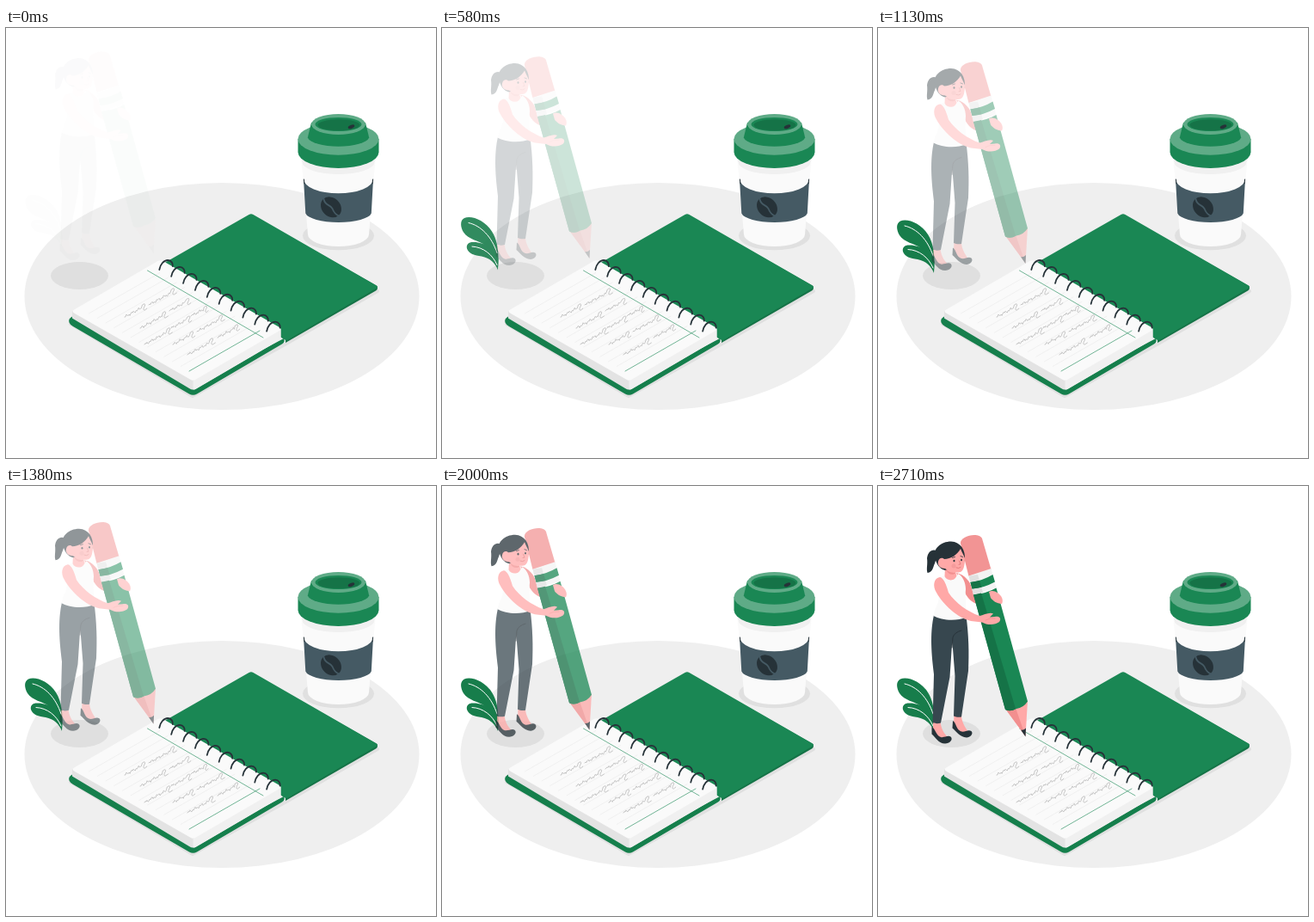
An HTML page for the animation above (2750 ms loop, 500 by 500 pixels).

```html
<!DOCTYPE html>
<html lang="en">
<head>
<meta charset="utf-8">
<title>Writing notes</title>
<style>
html, body { margin: 0; width: 100%; height: 100%; overflow: hidden; background: #fff; }
svg { display: block; width: 100vw; height: 100vh; }
</style>
</head>
<body>
<svg viewBox="0 0 500 500" fill="none" stroke-linecap="round" stroke-linejoin="round">
  <ellipse cx="251" cy="312" rx="229.5" ry="132" fill="#efefef"/>
  <ellipse cx="85.5" cy="288" rx="33.5" ry="16" fill="#dfdfdf"/>

  <g id="cup">
    <ellipse cx="386.5" cy="241.5" rx="41.5" ry="16.8" fill="#e0e0e0"/>
    <path d="M343 148L351 240A35.500 14 0 0 0 422 240L430 148Z" fill="#fafafa"/>
    <path d="M343.500 150L344.500 156A42 14 0 0 0 428.500 156L429.500 150Z" fill="#f0f0f0"/>
    <path d="M346 175.500L348.300 215.500A38.500 11.800 0 0 0 424.800 215.500L427 175.500A40.500 16.800 0 0 1 346 175.500Z" fill="#455a64"/>
    <path d="M346.400 176L347 181M426.600 176L426 181" stroke="#263238"/>
    <ellipse cx="378" cy="208.300" rx="13" ry="10.800" transform="rotate(45 378 208.300)" fill="#263238"/>
    <path d="M369.500 199C371 207 377 205 379.500 210C381.500 215 383 217 387 218.500" stroke="#455a64" stroke-width="1.800"/>
    <path d="M339.500 129V144.300A47 18.700 0 0 0 433.500 144.300V129Z" fill="#1a8754"/>
    <ellipse cx="386.500" cy="129" rx="47" ry="18.800" fill="#5fab87"/>
    <path d="M355 110L350.800 127.500A36 11.800 0 0 0 422.200 127.500L418 110Z" fill="#1a8754"/>
    <ellipse cx="386.500" cy="112" rx="31.500" ry="12" fill="#5fab87"/>
    <ellipse cx="386.500" cy="112" rx="27" ry="8" fill="#1a8754"/>
    <ellipse cx="387" cy="112.800" rx="24.500" ry="6.500" fill="#157347"/>
    <ellipse cx="401.500" cy="114.800" rx="4" ry="2" transform="rotate(-22 401.500 114.800)" fill="#263238"/>
  </g>

  <g id="book">
    <path d="M75 344L217 428L326 367L432 306" stroke="#e0e0e0" stroke-width="4"/>
    <path d="M185 277L325 362V366L430 305.500Q433 303.500 431.500 300L285 217Z" fill="#157347"/>
    <path d="M282.500 217Q285 215.500 287.500 217L430 299Q433.500 301 430 303L326 363.500L181 277V275Z" fill="#1a8754"/>
    <path d="M77 335.500Q72 338 73.500 342.500Q74.500 345 78 347L213 425.500Q217.500 428 222 425.500L321 367.500Q325 365 323 361L217 417Z" fill="#157f4c"/>
    <path d="M77 329V337.500L213 419Q217.500 422 222 419L319.500 362V350Z" fill="#e3e3e3"/>
    <path d="M217.500 410L319.500 350.500V362L222 419Q220 420.500 217.500 420.500Z" fill="#f0f0f0"/>
    <path d="M80 327L176.500 271Q180 269.500 183.500 271.500L318 348Q321 350 318 352L221 408.500Q217.500 411 214 408.500L80 332Q75 329.500 80 327Z" fill="#fafafa"/>
    <path id="rules" stroke="#eeeeee" stroke-width=".8"/>
    <path d="M164.500 282L299 360M213 399L295 352" stroke="#63ad8b" stroke-width=".9"/>
    <path id="words" stroke="#c0c0c0" stroke-width=".9"/>
    <path id="rings" stroke="#263238" stroke-width="1.800"/>
  </g>

  <g id="plant">
    <path d="M65 284C66 274 62 265 50 256C42 250 31 250 25 241C21 234 21 227 26 224.500C34 221 50 227 58 240C65 251 66.500 266 65 284Z" fill="#177d4b"/>
    <path d="M31 230C45 233 58 246 64 265" stroke="#fff"/>
    <path d="M65 285C62 277 56 271 46 269C38 268 31 266 29 260C28 255 31 252.500 36 252.500C49 252 63 261 65.500 272Z" fill="#177d4b"/>
    <path d="M35 257.500C48 258 59 267 64 279" stroke="#fff"/>
  </g>

  <g id="figure">
    <path d="M88.500 265L97 266C97 274 101 280 105 286L97 288L88 277Z" fill="#ffa8a7"/>
    <path d="M64 271L72.500 273C73 281 76 287 81 292L72 294L64 284Z" fill="#ffa8a7"/>
    <path d="M87 273C91 275 91 284 97 285.500C101 286.500 105 282.500 108.500 285C111.500 288 107 292.500 103 292.500C95 292 91 285 86.500 281.500Z" fill="#263238"/>
    <path d="M62.500 280C67 282 67 290 73 292C77 293 81 289.500 84.500 291.500C88 295 83 299.500 78 299.500C70 299.500 67 292 62.500 288.500Z" fill="#263238"/>
    <path d="M65 150C61 168 61 188 65 219L63.500 275C66 276.500 70 276.500 73 275.500L83.500 222L86.300 180L89.500 221L88 267.500C91 269 94 269 97 268.500L105 215C106 193 105.500 174 102.500 151Z" fill="#37474f"/>
    <path d="M97 168Q89 170 87 176L86 188" stroke="#263238" stroke-width=".9"/>
    <path d="M91 101C101 103 107 111 110 120L115 137C109 135 105 131 102 126Z" fill="#f28f8f"/>

    <path d="M96 67C94 58.500 117 52.500 121 61L131.500 97L105.500 105Z" fill="#f29494"/>
    <path d="M105.500 104.500L131.500 96L137.500 118.500L111 126.500Z" fill="#f3f3f3"/>
    <path d="M105.500 104.500L116 103L122 124L111 126.500Z" fill="#e0e0e0"/>
    <path d="M107.500 112Q122 110 133.500 103L136 111.500Q122 119 109.500 119.500Z" fill="#1a8754"/>
    <path d="M107.500 112L118 110L120.500 117.800L109.500 119.500Z" fill="#157347"/>
    <path d="M148 259L171.500 291L174 250Z" fill="#ffa8a7"/>
    <path d="M148 259L171.500 291L160 258Z" fill="#f28f8f"/>
    <path d="M166 283.500Q169 284.500 172 281.500L171.500 291.500Z" fill="#263238"/>
    <path d="M111 126.500Q126 125 137.500 118.500L174 250.500Q169 258 161 259Q154 263 148 260Z" fill="#1a8754"/>
    <path d="M111 126.500L120 124.500L160 259Q154 263 148 260Z" fill="#157347"/>

    <path d="M129 123C134 120 140 124 143 128C145.500 132 145 135 144 137C138 137 133 133 131 130Z" fill="#ffa8a7"/>
    <path d="M71 106L79 104C83 111 90 110 93 102C98 104 102 112 102 120C101 130 103 142 102.500 152.500C92 157.500 74 156.500 64.500 151C66 140 73 136 70 124Z" fill="#fafafa"/>
    <path d="M78 94L77.500 105C80 111 90 111 91.500 104L89 98Z" fill="#ffa8a7"/>
    <path d="M79 97C83 101 87 101 91 100.500C88 104 82 104 79 97Z" fill="#f28f8f"/>
    <path d="M72 106C65 107 63 116 68 124C76 138 92 153 108 157L121 158.500C127 162 136 162 141 158C144 154 141 151 136 152L130 152.500L134 148.500C130 146 123 150 118 151C104 146 90 136 82 124C79 113 76 107 72 106Z" fill="#ffa8a7"/>
    <path d="M125 156Q130 153 136 154" stroke="#f28f8f" stroke-width=".7"/>

    <path d="M68 75C62 73 58 77 57 84C58 91 56 96 57.500 101C64 100 64 94 66 90C68 85 68 80 68 75Z" fill="#263238"/>
    <path d="M66 82C64 73 73 64.500 85 64.500C96 65 102 74 101 87L94 92L78 98C72 97 67 90 66 82Z" fill="#263238"/>
    <path d="M77 85C85 85 92 80 96 73C98 78 100 81 101 84C101 91 100 98 96 100C90 101.500 83 100 78 96C72 96 69 92 70 88C71 83 75 83 77 85Z" fill="#ffa8a7"/>
    <circle cx="88" cy="93" r="2.500" fill="#f59b9b"/>
    <ellipse cx="88.500" cy="87" rx="1" ry="1.300" fill="#263238"/>
    <ellipse cx="97" cy="86" rx=".9" ry="1.200" fill="#263238"/>
    <path d="M86.500 83.500L89.500 82.500M96 81.500L98.500 82.500" stroke="#263238" stroke-width=".8"/>
    <path d="M94.500 87L96 91L94 91.300M91 95Q94 96.500 96 94.500" stroke="#d96d6d" stroke-width=".7"/>
  </g>
</svg>
<script>
const el = id => document.getElementById(id);
const LOOP = 2750, FPS = 24, FRAMES = 66, DROP = 30;

const repeat = (n, f) => Array.from({ length: n }, (_, i) => f(i)).join('');

el('rules').setAttribute('d', repeat(12, i => {
  const x = 213 - 9.7 * (i + 1), y = 399 - 5.6 * (i + 1);
  return `M${x} ${y}l82 -47`;
}));

el('rings').setAttribute('d', repeat(10, i =>
  `M${178.3 + 13.87 * i} ${281 + 7.95 * i}c1 -6 5 -11 10 -11c4 0 6 4 5.500 7`));

// Handwriting: a small waver that climbs along the rules and ends in a loop.
function scribble([x, y, w]) {
  const n = Math.round(w / 1.2);
  let d = `M${x} ${y}`;
  for (let i = 1; i < n; i++) {
    const k = i / n;
    const wave = 1.1 * Math.sin(i * 2.3 + x) + 0.9 * Math.sin(i * 0.9 + y);
    d += `L${(x + k * w * 0.85).toFixed(1)} ${(y - k * w * 0.46 + wave).toFixed(1)}`;
  }
  return d + `L${x + w * 0.85} ${y - w * 0.58}q4 -3 3 1q-3 5 0 5l${w * 0.1} -2`;
}
const words = [
  [138, 336, 24], [166, 322, 31], [156, 349, 31], [190, 329, 23], [161, 368, 31],
  [192, 349, 22], [215, 335, 18], [194, 368, 24], [222, 353, 31], [211, 380, 31], [246, 360, 24]
];
el('words').setAttribute('d', words.map(scribble).join(''));

function bezier(x1, y1, x2, y2) {
  const at = (a, b, s) => 3 * (1 - s) ** 2 * s * a + 3 * (1 - s) * s * s * b + s ** 3;
  return x => {
    if (x >= 1) return 1;
    let lo = 0, hi = 1;
    for (let i = 0; i < 24; i++) {
      const mid = (lo + hi) / 2;
      if (at(x1, x2, mid) < x) lo = mid; else hi = mid;
    }
    return at(y1, y2, lo);
  };
}
const overshoot = bezier(0.36, -0.01, 0.5, 1.38);

function slideDown(node, p) {
  node.setAttribute('opacity', Math.max(0, Math.min(1, p)));
  node.setAttribute('transform', `translate(0 ${DROP * (p - 1)})`);
}

function draw(ms) {
  const frame = Math.max(1, Math.floor((ms % LOOP) * FPS / 1000 + 0.3));
  slideDown(el('figure'), Math.min(1, frame / (FRAMES - 1)));
  slideDown(el('plant'), overshoot(frame / FPS));
}

const start = performance.now();
function tick() {
  draw(performance.now() - start);
  requestAnimationFrame(tick);
}
tick();
</script>
</body>
</html>
```
